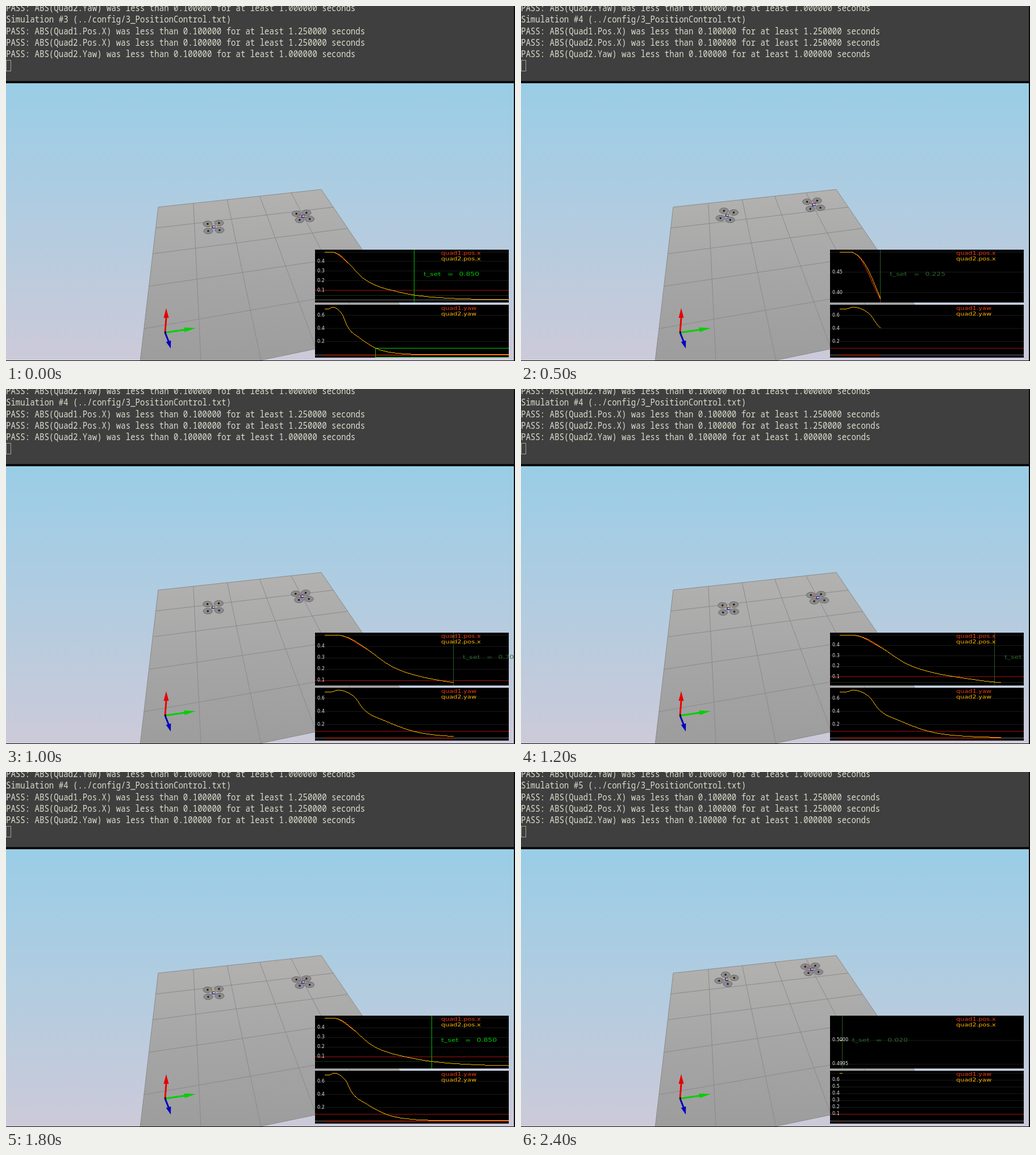
Write an HTML page with a canvas that moves like this. It is 896 px wide and 625 px high and loops after 2500 ms.

```html
<!DOCTYPE html>
<html lang="en">
<head>
<meta charset="utf-8">
<title>Position control simulation</title>
<style>
  html, body { margin: 0; width: 100%; height: 100%; overflow: hidden; background: #000; }
  #stage { position: relative; width: 896px; height: 625px; overflow: hidden; background: #0a0a0a; }
  #term { position: absolute; left: 0; top: 0; width: 894px; height: 132px; overflow: hidden; background: #3f3f3f; }
  #term pre {
    position: absolute; left: 0; top: -8px; margin: 0; color: #dcdccc;
    font: 14.05px/17px "Noto Sans Mono", "DejaVu Sans Mono", monospace;
    transform: scaleY(1.2); transform-origin: 0 0;
  }
  #cursor { position: absolute; left: 0; top: 95px; width: 7px; height: 18px; border: 1px solid #a4a498; }
  canvas { position: absolute; left: 0; top: 0; }
</style>
</head>
<body>
<div id="stage">
  <div id="term">
<pre>PASS: ABS(Quad2.Yaw) was less than 0.100000 for at least 1.000000 seconds
Simulation #<span id="run">3</span> (../config/3_PositionControl.txt)
PASS: ABS(Quad1.Pos.X) was less than 0.100000 for at least 1.250000 seconds
PASS: ABS(Quad2.Pos.X) was less than 0.100000 for at least 1.250000 seconds
PASS: ABS(Quad2.Yaw) was less than 0.100000 for at least 1.000000 seconds</pre>
    <div id="cursor"></div>
  </div>
  <canvas id="view" width="896" height="625"></canvas>
</div>
<script>
const ctx = document.getElementById('view').getContext('2d');
const runLabel = document.getElementById('run');
const RED = '#f53a10', AMBER = '#ffb400', GREEN = '#00d000', LIMIT = '#a01212';
const LOOP = 2500, STEP = 100;

const mix = (a, b, u) => a + (b - a) * u;
const bump = (t, mid, width) => Math.exp(-(((t - mid) / width) ** 2));

// Flat start, smooth curve through the key points, then exponential decay.
function response(keys, rate) {
  const last = keys.length - 1;
  const slope = i => {
    if (i === 0) return 0;
    if (i === last) return -rate * keys[i][1];
    return (keys[i + 1][1] - keys[i - 1][1]) / (keys[i + 1][0] - keys[i - 1][0]);
  };
  return t => {
    if (t <= keys[0][0]) return keys[0][1];
    if (t >= keys[last][0]) return keys[last][1] * Math.exp(-rate * (t - keys[last][0]));
    const i = keys.findIndex(k => k[0] > t) - 1;
    const [t0, y0] = keys[i], [t1, y1] = keys[i + 1];
    const h = t1 - t0, u = (t - t0) / h, v = 1 - u;
    return y0 * (1 + 2 * u) * v * v + slope(i) * h * u * v * v
      + y1 * u * u * (3 - 2 * u) - slope(i + 1) * h * u * u * v;
  };
}

// Simulated signals over seconds
const pos2 = response([[.05, .5], [.13, .474], [.22, .386], [.36, .228], [.5, .144], [.7, .082], [.85, .05]], 3.25);
const pos1 = t => pos2(t) - .009 * bump(t, .17, .05);
const yaw2 = response([[.03, .7], [.075, .73], [.125, .69], [.165, .61], [.205, .455], [.25, .352],
  [.31, .279], [.4, .175], [.482, .1]], 7.3);
const yaw1 = () => 0;

// Simulation seconds at a given step; the pace varies a little.
function clock(step) {
  const keys = [[5, .22], [10, .7], [14, 1.058], [22, 1.844]];
  const i = step < 10 ? 0 : step < 14 ? 1 : 2;
  const [a, ta] = keys[i], [b, tb] = keys[i + 1];
  return mix(ta, tb, (step - a) / (b - a));
}

function simAt(step) {
  if (step < 3) return { run: 3, t: 1.738 + .098 * step };
  if (step < 24) return { run: 4, t: clock(step) };
  return { run: 5, t: .015 };
}

function path(pts, close) {
  ctx.beginPath();
  pts.forEach(([x, y]) => ctx.lineTo(x, y));
  if (close) ctx.closePath();
}

function line(a, b, color, width = 1) {
  path([a, b]);
  ctx.strokeStyle = color;
  ctx.lineWidth = width;
  ctx.stroke();
}

function box(x, y, w, h, color) {
  ctx.fillStyle = color;
  ctx.fillRect(x, y, w, h);
}

const hline = (xa, xb, y, color) => box(Math.floor(xa), Math.floor(y), xb - Math.floor(xa), 1, color);
const vline = (x, ya, yb, color) => box(Math.floor(x), Math.floor(ya), 1, yb - Math.floor(ya), color);

function text(str, x, y, color, size = 9, stretch = 1.26) {
  ctx.save();
  ctx.translate(x, y);
  ctx.scale(stretch, 1);
  ctx.font = size + 'px "DejaVu Sans", sans-serif';
  ctx.fillStyle = color;
  ctx.fillText(str, 0, 0);
  ctx.restore();
}

function gradient(ya, yb, ...colors) {
  const g = ctx.createLinearGradient(0, ya, 0, yb);
  colors.forEach((c, i) => g.addColorStop(i / (colors.length - 1), c));
  return g;
}

function clipTo(x, y, w, h) {
  ctx.save();
  ctx.beginPath();
  ctx.rect(x, y, w, h);
  ctx.clip();
}

function arrow(from, base, tip, color, half) {
  line(from, base, color, 3);
  const dx = tip[0] - base[0], dy = tip[1] - base[1], n = Math.hypot(dx, dy);
  const ox = -dy / n * half, oy = dx / n * half;
  path([[base[0] + ox, base[1] + oy], tip, [base[0] - ox, base[1] - oy]], true);
  ctx.fillStyle = color;
  ctx.fill();
}

// Division i of 5 along an edge seen in perspective.
function along(a, b, i, depth) {
  const u = i * (1 - 5 * depth) / (5 * (1 - depth * i));
  return [mix(a[0], b[0], u), mix(a[1], b[1], u)];
}

function drawScene() {
  const a = [268, 354], b = [555, 323], c = [721, 567], d = [231, 669];
  box(0, 136, 894, 488, gradient(136, 624, '#99cde6', '#b2cce0', '#cccad9'));
  path([a, b, c, d], true);
  ctx.fillStyle = gradient(323, 624, '#b3b2b1', '#a6a6a6', '#9d9d9d');
  ctx.fill();
  for (let i = 0; i <= 5; i++) {
    line(along(a, d, i, .094), along(b, c, i, .083), '#8a8a8a');
    line(along(a, b, i, -.02), along(d, c, i, -.04), '#8a8a8a');
  }
  arrow([280, 575], [282, 549], [282, 532], '#e60000', 4.5);
  arrow([280, 575], [314, 570], [334, 567], '#00d000', 4);
  arrow([280, 575], [286, 590], [290, 603], '#0000c0', 4.5);
  box(279, 573, 3, 3, '#111');
}

// p and q: offsets of the two upper rotors; the lower pair mirrors them.
function drawDrone(x, y, p, q, tilt, color) {
  const rotors = [p, q, [-q[0], -q[1]], [-p[0], -p[1]]].map(([a, b]) => [x + a, y + b * tilt]);
  rotors.forEach(([rx, ry]) => {
    ctx.beginPath();
    ctx.ellipse(rx, ry, 8, 5, 0, 0, 7);
    ctx.fillStyle = '#8c8c8c';
    ctx.fill();
    ctx.strokeStyle = '#686868';
    ctx.lineWidth = 1;
    ctx.stroke();
  });
  rotors.forEach(([rx, ry], i) => {
    const upper = i < 2;
    line([x, y], [mix(x, rx, .75), mix(y, ry, .75)], upper ? color : '#7c7c84', 1.2);
    box(rx - 1.5, ry - 1.5, 3, 3, upper ? '#18181e' : '#1a1a40');
  });
  box(x - 3, y - 2.5, 6, 5, '#2a2a80');
  box(x - 1.5, y - 1.5, 4, 2.5, '#c8c8dc');
}

function drawDrones(t) {
  const gone = 1 - pos2(t) / .5, turn = yaw2(t) / .7, tilt = 1 + .15 * bump(t, .2, .12);
  drawDrone(mix(362, 365.5, gone), mix(365, 389.3, gone ** 1.3),
    [-10.5 + 8.5 * turn, -5.5 - 2.5 * turn], [9.5 + 3.7 * turn, -7 + 4.5 * turn], tilt, '#d0a030');
  drawDrone(mix(512, 523, gone ** .8), mix(347.4, 370.5, gone ** 1.5), [-11.7, -4.6], [6, -6.3], tilt, '#d84020');
}

function tickStep(range) {
  const base = 10 ** Math.floor(Math.log10(range) + 1e-6);
  const n = range / base;
  return n < 2 ? base / 2 : n > 7.2 ? base * 2 : base;
}

// One hard-edged pixel column at a time.
function trace(f, t, px, py, color) {
  const perPixel = t / (px(t) - 561);
  let prev = Math.floor(py(f(0)));
  for (let x = 561; x <= px(t); x++) {
    const y = Math.floor(py(f((x - 561) * perPixel)));
    box(x, Math.min(y, prev + 1), 1, Math.max(1, y - prev), color);
    prev = y;
  }
}

function plot(top, t, lo, hi, first, second, name, extras) {
  const px = s => 561 + s * 323 / Math.max(1, t);
  const py = v => top + 88 - (v - lo) / (hi - lo) * 84;
  clipTo(544, top, 341, 93);
  box(544, top, 341, 93, '#000');

  const step = tickStep(hi - lo), digits = step < .01 ? 4 : step < .09 ? 2 : 1;
  const ticks = [];
  for (let k = Math.ceil(lo / step - .05); k * step <= hi + step * .01; k++) ticks.push(k * step);
  ticks.forEach(v => hline(544, 885, py(v), v === 0 ? '#707070' : '#191919'));
  extras(px, py);
  trace(first, t, px, py, RED);
  trace(second, t, px, py, AMBER);
  ticks.forEach(v => {
    const y = py(v);
    if (y > top + 8 && y < top + 87) text(v.toFixed(digits), 548, y + 2, '#e0e0e0', 8, 1);
  });
  text('quad1.' + name, 766, top + 9, RED);
  text('quad2.' + name, 766, top + 18.5, AMBER);
  ctx.restore();
  return px;
}

// Threshold line; a green box once the signal has stayed inside it long enough.
function limit(px, py, since, hold, t) {
  if (t < since + hold) return hline(544, 885, py(.1), LIMIT);
  const x = px(since), bottom = py(0) + 4;
  hline(x, 885, py(.1), GREEN);
  hline(x, 885, bottom, GREEN);
  vline(x, py(.1), bottom, GREEN);
}

function drawPlots(t) {
  const flat = t < .05, mark = Math.min(t, .845), settled = t > 1.2;
  const lo = flat ? .49947 : Math.min(pos1(t), pos2(t)), hi = flat ? .50047 : .5;
  const px = plot(429, t, lo, hi, pos1, pos2, 'pos.x', (px, py) => {
    hline(544, 885, py(.05), '#173417');
    limit(px, py, .64, 1.25, t);
    vline(px(mark), 429, 522, settled ? '#00c000' : '#285c28');
  });
  plot(526, t, 0, yaw2(Math.min(t, .075)), yaw1, yaw2, 'yaw', (px, py) => limit(px, py, .482, 1, t));

  const x = px(mark) + 17, color = settled ? GREEN : '#2a6a2a';
  clipTo(0, 136, 894, 488);
  text('t_set', x, 475, color, 9, 1.4);
  text('=', x + 42, 475, color, 9, 1.4);
  text((mark + .005).toFixed(3), x + 62.5, 475, color, 9, 1.38);
  ctx.restore();
}

function draw(step) {
  const { run, t } = simAt(step);
  runLabel.textContent = run;
  ctx.clearRect(0, 0, 896, 625);
  clipTo(0, 136, 894, 488);
  drawScene();
  drawDrones(t);
  ctx.restore();
  drawPlots(t);
}

const start = performance.now();
let shown = -1;
function tick() {
  const step = Math.floor((performance.now() - start) % LOOP / STEP);
  if (step !== shown) draw(shown = step);
  requestAnimationFrame(tick);
}
tick();
</script>
</body>
</html>
```
